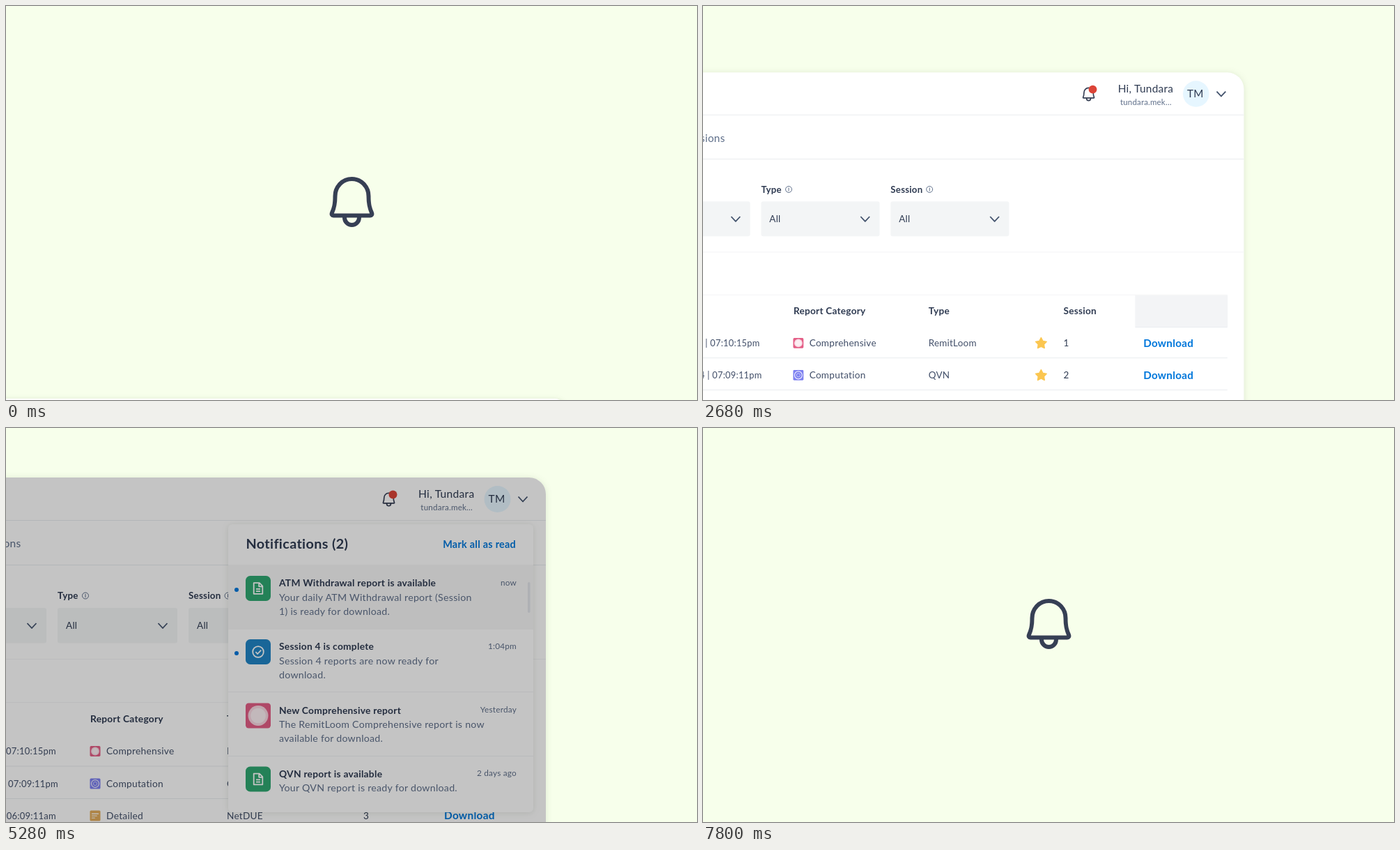
These frames come from a looping animation (992x565 px, 8240 ms). An HTML page:

```html
<!DOCTYPE html>
<html lang="en">
<head>
<meta charset="utf-8">
<title>Report notifications</title>
<style>
  html, body { margin: 0; width: 100%; height: 100%; overflow: hidden; background: #f7ffeb; }
  svg { display: block; width: 992px; height: 565px; }
  text { font-family: Lato, sans-serif; letter-spacing: .018em; white-space: pre; }
  .headline text { font: 500 41.3px Inter, sans-serif; letter-spacing: 0; fill: #363f54; }
  .shadow { filter: drop-shadow(0 1px 5px rgba(50, 70, 30, .13)); }
</style>
</head>
<body>
<svg id="stage" viewBox="0 0 992 565"></svg>
<script>
const DARK = '#2f3b52', GRAY = '#5f6f8a', BLUE = '#0077db', RED = '#dc4437', PALE = '#f3f5f6';

// ---- drawing helpers (y of a label is its visual middle) ----
const label = (x, y, str, size = 14.2, fill = GRAY, weight = 400, anchor = 'start') =>
  `<text x="${x}" y="${y + size * .35}" font-size="${size}" font-weight="${weight}" fill="${fill}" text-anchor="${anchor}">${str}</text>`;
const bold = (x, y, str, size = 13.8, fill = DARK, anchor) => label(x, y, str, size, fill, 700, anchor);
const box = (x, y, w, h, fill, r = 0, extra = '') =>
  `<rect x="${x}" y="${y}" width="${w}" height="${h}" rx="${r}" fill="${fill}" ${extra}/>`;
const disc = (x, y, r, fill, extra = '') => `<circle cx="${x}" cy="${y}" r="${r}" fill="${fill}" ${extra}/>`;
const stroke = (x, y, d, color, width, scale = 1) =>
  `<path transform="translate(${x} ${y}) scale(${scale})" d="${d}" fill="none" stroke="${color}" stroke-width="${width}" stroke-linejoin="round"/>`;
const rule = (y, x2 = 775, x1 = -400, color = '#e9ecef') => box(x1, y, x2 - x1, 1, color);

const BELL = 'M-24-8.5a24 24.5 0 0 1 48 0C24 5 26 10 28.5 15.5C29.5 18 28.5 19.5 26.5 19.5H-26.5' +
  'C-28.5 19.5-29.5 18-28.5 15.5C-26 10-24 5-24-8.5ZM-10.5 19.5v3a10.5 10.5 0 0 0 21 0v-3';
const bell = (x, y, scale) => stroke(x, y, BELL, '#363f54', 6, scale);
const chevron = (x, y) => stroke(x, y, 'M-6.5-3.5L0 3.5L6.5-3.5', '#43536d', 1.8);
const download = (x, y, color) => stroke(x, y, 'M-8 1.5v6.5h16V1.5M0-8.5V3M-4.5-1.5L0 3L4.5-1.5', color, 2);
const info = (x, y) => disc(x, y, 4.5, 'none', `stroke="${GRAY}"`) + box(x - .5, y - 2.5, 1, 5, GRAY);

function star(x, y) {
  let points = '';
  for (let i = 0; i < 10; i++) {
    const r = i % 2 ? 4.4 : 8.4, a = i * Math.PI / 5;
    points += `${x + r * Math.sin(a)},${y - r * Math.cos(a)} `;
  }
  return `<polygon points="${points}" fill="#fbc650" stroke="#fbc650" stroke-width="1.4" stroke-linejoin="round"/>`;
}

// Category tiles are drawn on a 60-unit square.
const tiles = {
  pink: box(0, 0, 60, 60, '#e45e86', 7) + disc(30, 30, 24, '#fff', 'opacity=".75"') + disc(30, 30, 18, '#fff', 'opacity=".6"'),
  purple: box(0, 0, 60, 60, '#7c7ff0', 6) +
    disc(30, 30, 22, 'none', 'stroke="#e9e9fd" stroke-width="5"') + disc(30, 30, 10.5, 'none', 'stroke="#c6c8f9" stroke-width="4"'),
  amber: box(0, 0, 60, 60, '#e2ac5b', 6) +
    box(9, 15.5, 42, 6, '#fdf6ec', 3) + box(9, 28, 33, 6, '#f6e3c6', 3) + box(9, 40, 21, 6, '#f6e3c6', 3),
  green: box(0, 0, 60, 60, '#2fa871', 11) +
    stroke(30, 30, 'M-10.5-13H3L10.5-5.5V13H-10.5ZM2-13V-4.500H10.5M-5 1.500H5M-5 7H5', '#fff', 3),
  blue: box(0, 0, 60, 60, '#2085c5', 11) +
    disc(30, 30, 13, 'none', 'stroke="#fff" stroke-width="3"') + stroke(30, 30, 'M-6 0L-1.500 5L7-4', '#fff', 3)
};
const tile = (kind, x, y, size) => `<g transform="translate(${x} ${y}) scale(${size / 60})">${tiles[kind]}</g>`;

// ---- report page ----
const select = (x, name) =>
  bold(x, 240.5, name, 13.4) + box(x, 258, 172, 50.5, PALE, 3) + label(x + 12, 283.5, 'All', 13.6, DARK) + chevron(x + 151, 283.5);

const row = (y, date, kind, category, type, session, starred) =>
  label(y === 510 ? 75 : 72, y, '12th Dec, 2024 | ' + date, 13, '#43506a', 400, 'end') +
  tile(kind, 120.5, y - 7.5, 15) + label(144, y, category, 13.8, '#43506a') + label(317, y, type, 13.6, '#43506a') +
  (starred ? star(480.5, y + .5) : '') + label(513, y, session, 13.6, DARK) + bold(629, y, 'Download', 15.4, BLUE) +
  rule(y + 21, 751);

const page =
  box(-400, 71, 1175, 700, '#fff', 24, 'class="shadow"') +
  bell(549.5, 102.5, .28) + disc(555.5, 95.5, 6, RED) +
  label(672.5, 95, 'Hi, Tundara', 15.6, DARK, 400, 'end') + label(670, 114, 'tundara.mek…', 11.6, GRAY, 400, 'end') +
  disc(705.5, 102, 19, '#e6f6ff') + label(704.5, 101.5, 'TM', 15.4, DARK, 400, 'middle') + chevron(742, 102) +
  rule(132) + rule(196) + rule(331, 775, -400, '#f3f4f6') + rule(393, 751, -400, '#f3f4f6') +
  box(-262, 146, 135.5, 38, BLUE, 19) + bold(-151, 165.500, 'All Reports', 15, '#fff', 'end') +
  label(21.5, 166, 'Report by Sessions', 15.5, GRAY, 400, 'end') +
  select(-114, 'Category') + select(74, 'Type') + info(114, 240.5) + select(262, 'Session') + info(318.5, 240.5) +
  box(617, 394, 134.5, 46, '#f3f4f6') + rule(440, 751, 617) +
  bold(-114, 417, 'Date') + bold(121, 417, 'Report Category') + bold(317, 417, 'Type') + bold(513, 417, 'Session') +
  row(463.5, '07:10:15pm', 'pink', 'Comprehensive', 'RemitLoom', '1', true) +
  row(510, '07:09:11pm', 'purple', 'Computation', 'QVN', '2', true) +
  row(556, '06:09:11am', 'amber', 'Detailed', 'NetDUE', '3');

// ---- notification panel ----
const notice = (y, kind, title, when, lines, unread) =>
  tile(kind, 344, y - 10.5, 36) + (unread ? disc(331, y + 9.5, 3, BLUE) : '') +
  bold(392, y, title) + label(733, y - 1, when, 11.8, GRAY, 400, 'end') +
  lines.map((line, i) => label(392, y + 20.5 + i * 19.6, line)).join('');

const panel =
  box(319, 138, 438, 413, '#fff', 6, 'class="shadow"') +
  bold(344.5, 166.5, 'Notifications (2)', 19.8) + bold(732, 166.5, 'Mark all as read', 14.4, BLUE, 'end') +
  box(319, 196, 438, 93, '#f7f7f7') + box(749, 221, 3.5, 44, '#e2e5ea', 1.7) +
  rule(378, 757, 319, '#f0f2f4') + rule(470, 757, 319, '#f0f2f4') +
  notice(222.5, 'green', 'ATM Withdrawal report is available', 'now',
    ['Your daily ATM Withdrawal report (Session', '1) is ready for download.'], true) +
  notice(313.5, 'blue', 'Session 4 is complete', '1:04pm', ['Session 4 reports are now ready for', 'download.'], true) +
  notice(405, 'pink', 'New Comprehensive report', 'Yesterday',
    ['The RemitLoom Comprehensive report is now', 'available for download.']) +
  notice(496, 'green', 'QVN report is available', '2 days ago', ['Your QVN report is ready for download.']);

// ---- detail drawer ----
const related = (y, kind) =>
  box(391, y, 363, 91.5, PALE, 6) + tile(kind, 407, y + 15, 61) + bold(479.5, y + 25, 'Report name') +
  label(479.5, y + 46.5, 'POS', 13.6) + label(479.5, y + 67.5, '12th Dec, 2024 | 10:01:59pm', 12.9) + download(727, y + 27, BLUE);

const drawer =
  box(369, 71, 406, 500, '#fff') + box(769, 94, 4, 44, '#dfe3ea', 2) +
  stroke(753.5, 93.5, 'M-5-5L5 5M5-5L-5 5', '#4b5a73', 2) +
  tile('pink', 392, 95.5, 15) + label(415.5, 103, 'Comprehensive', 13.6) +
  bold(392, 129.5, 'Daily ATM Withdrawal - 9/01/2025', 18.9) + label(392, 153, 'Created 12th Dec, 2024 | 10:01:59pm', 11.2) +
  rule(181, 775, 369) + label(392, 214.5, 'Type', 11.5) + bold(392, 234, 'EverDue', 13.8) +
  label(515, 214.5, 'Session', 11.4) + bold(515, 234, '1') +
  box(638, 206, 116, 38.5, BLUE, 3) + download(657, 225.5, '#fff') + bold(677, 226, 'Download', 13.5, '#fff') +
  rule(265, 775, 369) + bold(392, 302.5, 'Related Reports', 15.5) + label(392, 323, 'Other EverDue reports', 11.6) +
  related(346, 'purple') + related(445.3, 'amber') + related(544.6, 'purple');

const stage = document.getElementById('stage');
stage.innerHTML = `
  <defs>
    <clipPath id="cardClip">${box(-400, 71, 1175, 700, '#000', 24)}</clipPath>
    <clipPath id="panelClip">${box(300, 132.5, 474, 460, '#000')}</clipPath>
  </defs>
  <g id="card">
    ${page}
    <g clip-path="url(#panelClip)"><g id="panel">${panel}</g></g>
    <g clip-path="url(#cardClip)">
      ${box(-400, 71, 1175, 700, '#000', 0, 'id="dim"')}
      <g id="drawer">${drawer}</g>
    </g>
  </g>
  <g id="alert">${bell(0, 0, 1)}<g id="dot">${disc(0, 0, 19.3, RED)}</g></g>
  <g id="headline" class="headline"><text id="line1" x="217"/><text id="line2" x="275" y="50"/></g>
  <g id="outro">${box(0, 0, 992, 565, '#f7ffeb')}${bell(496.5, 281, 1)}</g>`;

// ---- motion ----
const LOOP = 8240;
const LINES = ['Your ATM Withdrawal report', 'is ready for download.'];
const CHARS = LINES[0].length + LINES[1].length;
const el = id => document.getElementById(id);
const progress = (t, start, duration = 800) => Math.min(1, Math.max(0, (t - start) / duration));
const mix = (a, b, p) => a + (b - a) * p;
const easeOut = x => 1 - (1 - x) ** 3;

// cubic-bezier(.49, 0, .1, 1)
function ease(x) {
  let lo = 0, hi = 1, s;
  for (let i = 0; i < 24; i++) {
    s = (lo + hi) / 2;
    const bx = 3 * (1 - s) * (1 - s) * s * .49 + 3 * (1 - s) * s * s * .1 + s ** 3;
    if (bx < x) lo = s; else hi = s;
  }
  return x <= 0 ? 0 : x >= 1 ? 1 : s * s * (3 - 2 * s);
}

const move = (id, x, y, scale = 1) => el(id).setAttribute('transform', `translate(${x} ${y}) scale(${scale})`);
function fade(id, opacity) {
  el(id).setAttribute('opacity', opacity);
  el(id).style.display = opacity > 0 ? '' : 'none';
}

function draw(t) {
  const typing = progress(t, 960), rise = ease(typing), exit = ease(progress(t, 2120));

  move('alert', 496.5, 281 - 58 * rise - 539 * exit);
  move('dot', 19, -26.5, easeOut(progress(t, 360, 320)));

  const shown = Math.ceil(CHARS * typing);
  el('line1').textContent = LINES[0].slice(0, shown);
  el('line2').textContent = LINES[1].slice(0, Math.max(0, shown - LINES[0].length));
  move('headline', 0, 411.5 - 93 * rise - 497 * exit);

  const scale = mix(.7705, 1, exit);
  move('card', mix(805.7, 775, exit) - 775 * scale, mix(563, 71, exit) - 71 * scale, scale);

  const drop = progress(t, 3200);
  fade('panel', drop > 0 ? 1 : 0);
  move('panel', 0, -431 * (1 - easeOut(drop)));

  fade('dim', .25 * ease(progress(t, 4760)));
  fade('drawer', progress(t, 5560, 320));
  fade('outro', ease(progress(t, 7000)));
}

const begin = performance.now();
function tick() {
  draw((performance.now() - begin) % LOOP);
  requestAnimationFrame(tick);
}
tick();
</script>
</body>
</html>
```
